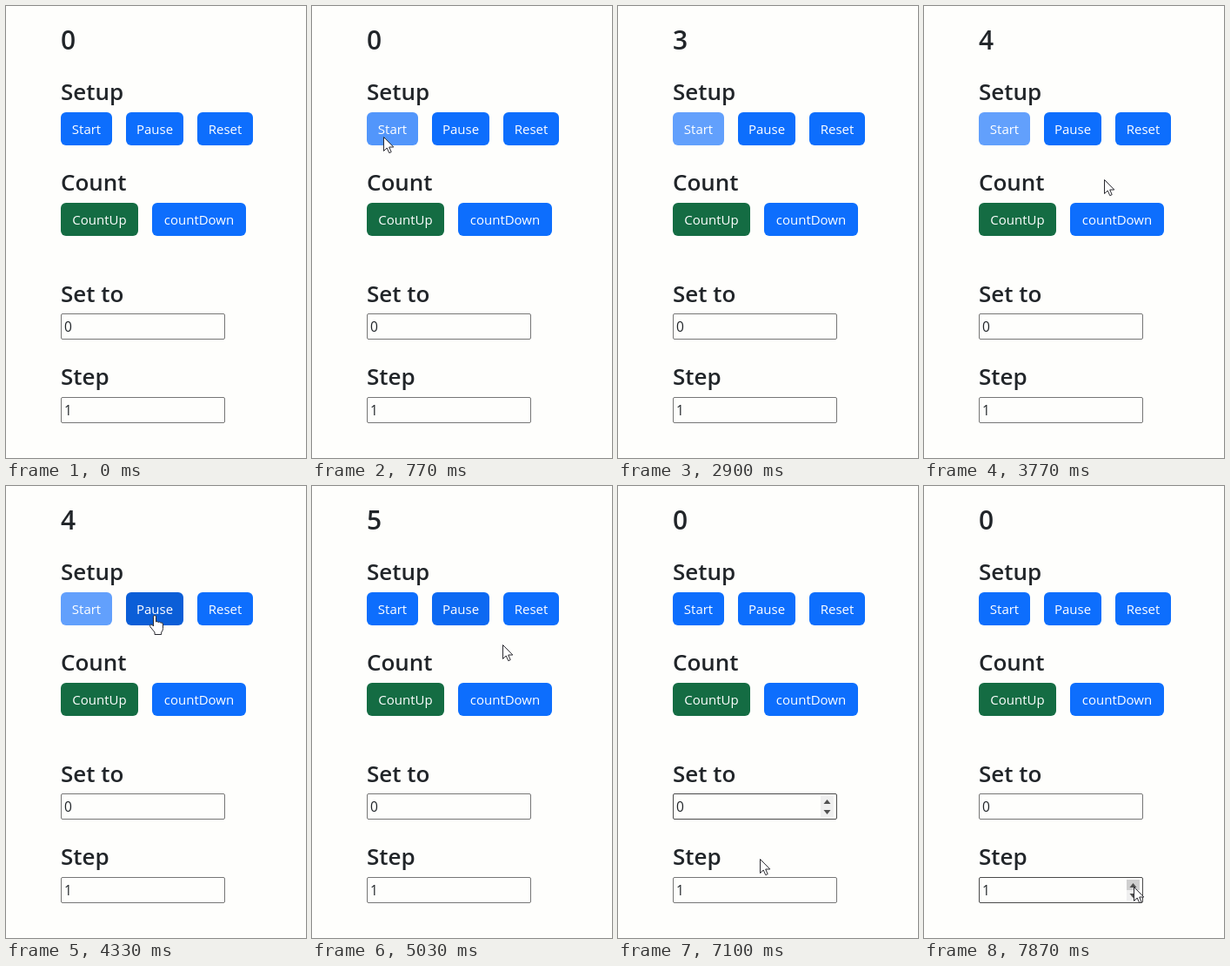
Animation, 345 px wide and 519 px high, one loop 8 s. Source, as an HTML page with a canvas:

```html
<!DOCTYPE html>
<html lang="en">
<head>
<meta charset="utf-8">
<title>Counter</title>
<style>
  html, body { margin: 0; width: 100%; height: 100%; overflow: hidden; background: #fefefc; }
  canvas { display: block; }
</style>
</head>
<body>
<canvas></canvas>
<script>
const W = 345, H = 519, LOOP = 8000;
const FONT = '"Open Sans", "Noto Sans", sans-serif';
const PAPER = '#fefefc', INK = '#212529';
const BLUE = [13, 110, 253], BLUE_HOVER = [11, 94, 215], BLUE_ACTIVE = [10, 88, 202];
const BLUE_OFF = [98, 160, 252], GREEN = [20, 108, 67];

const canvas = document.querySelector('canvas');
const scale = window.devicePixelRatio || 1;
canvas.width = W * scale;
canvas.height = H * scale;
canvas.style.width = W + 'px';
canvas.style.height = H + 'px';
const ctx = canvas.getContext('2d');

const START = 650, PAUSE = 4650, RESET = 5870, TICK = 750;

const buttons = [
  { label: 'Start', x: 63, y: 122, w: 59, press: START },
  { label: 'Pause', x: 138, y: 122, w: 66, press: PAUSE },
  { label: 'Reset', x: 220, y: 122, w: 64, press: RESET },
  { label: 'CountUp', x: 63, y: 226, w: 89, green: true },
  { label: 'countDown', x: 168, y: 226, w: 108 }
];
const inputs = [
  { y: 353, value: '0', from: 6850, to: 7150 },
  { y: 449, value: '1', from: 7190, to: LOOP }
];

// Each visit of the pointer: time, x, y
const visits = [
  [[30, 346, 446], [260, 225, 335], [430, 160, 246], [570, 82, 150], [1000, 82, 150],
   [1240, 205, 178], [1500, 348, 248]],
  [[3330, 348, 330], [3560, 290, 222], [3770, 207, 199], [4050, 171, 149], [4860, 171, 149],
   [5030, 219, 182], [5220, 241, 172], [5560, 253, 149], [6400, 253, 149], [6640, 232, 245],
   [6880, 202, 340], [7000, 184, 385], [7100, 163, 428], [7200, 165, 446], [7400, 203, 463],
   [7630, 241, 466], [7760, 241, 466], [7830, 241, 460], [8001, 241, 460]]
];

const clamp = v => Math.max(0, Math.min(1, v));
const mix = (a, b, k) => a.map((v, i) => v + (b[i] - v) * k);
const rgb = c => `rgb(${c.map(Math.round).join(',')})`;
const still = (a, b) => a[1] === b[1] && a[2] === b[2];

function slope(path, i, axis) {
  const a = path[i - 1], p = path[i], b = path[i + 1];
  if (!a || !b || still(a, p) || still(p, b)) return 0;
  return (b[axis] - a[axis]) / (b[0] - a[0]);
}

function pointer(t) {
  const path = visits.find(v => t >= v[0][0] && t < v[v.length - 1][0]);
  if (!path) return null;
  const i = path.findIndex((p, n) => t >= p[0] && t < path[n + 1][0]);
  const a = path[i], b = path[i + 1], span = b[0] - a[0], u = (t - a[0]) / span;
  const along = axis =>
    (1 + 2 * u) * (1 - u) ** 2 * a[axis] + u * (1 - u) ** 2 * span * slope(path, i, axis) +
    u * u * (3 - 2 * u) * b[axis] - u * u * (1 - u) * span * slope(path, i + 1, axis);
  return { x: along(1), y: along(2) };
}

const running = t => t >= START && t < PAUSE;

function hits(b, t) {
  const p = pointer(t);
  if (!p || (b.label === 'Start' && running(t))) return false;
  return p.x >= b.x && p.x < b.x + b.w && p.y >= b.y && p.y < b.y + 38;
}

// Averaging the recent past gives a 150 ms linear transition
function hover(b, t) {
  let sum = 0;
  for (let k = 0; k < 10; k++) sum += hits(b, t - k * 15);
  return sum / 10;
}

function count(t) {
  if (t < START || t >= RESET) return 0;
  return Math.floor((Math.min(t, PAUSE) - START) / TICK);
}

function text(str, x, y, size, weight, color = INK) {
  ctx.font = `${weight} ${size}px ${FONT}`;
  ctx.fillStyle = color;
  ctx.fillText(str, x, y);
}

function drawButton(b, t) {
  let color = b.green ? GREEN : mix(BLUE, BLUE_HOVER, hover(b, t));
  if (b.label === 'Start') {
    color = mix(color, BLUE_OFF, clamp((t - START) / 150) - clamp((t - PAUSE) / 150));
  } else if (b.press) {
    const down = clamp((t - b.press + 70) / 70) - clamp((t - b.press) / 130);
    color = mix(color, BLUE_ACTIVE, down);
  }
  ctx.fillStyle = rgb(color);
  ctx.beginPath();
  ctx.roundRect(b.x, b.y, b.w, 38, 6);
  ctx.fill();
  ctx.textAlign = 'center';
  text(b.label, b.x + b.w / 2, b.y + 25, 15, 400, '#fff');
  ctx.textAlign = 'left';
}

function triangle(x, y, dir) {
  ctx.beginPath();
  ctx.moveTo(x - 4, y);
  ctx.lineTo(x + 4, y);
  ctx.lineTo(x, y - 5 * dir);
  ctx.fill();
}

function drawInput(f, t) {
  const over = t >= f.from && t < f.to;
  ctx.fillStyle = PAPER;
  ctx.strokeStyle = over ? '#4a4a4a' : '#767676';
  ctx.lineWidth = 1;
  ctx.beginPath();
  ctx.roundRect(63.5, f.y + 0.5, 188, 29, 1.5);
  ctx.fill();
  ctx.stroke();
  text(f.value, 67, f.y + 21, 15.5, 400);
  if (!over) return;
  ctx.fillStyle = '#efefef';
  ctx.fillRect(233, f.y + 3, 15, 24);
  const p = pointer(t);
  if (p && p.x >= 233 && p.y >= f.y && p.y < f.y + 30) {
    ctx.fillStyle = '#cfcfcf';
    ctx.fillRect(233, f.y + (p.y < f.y + 15 ? 3 : 15), 15, 12);
  }
  ctx.fillStyle = '#505050';
  triangle(240.5, f.y + 12, 1);
  triangle(240.5, f.y + 19, -1);
}

const ARROW = new Path2D('M.5 .5V16.5L4.2 13L6.8 18.7L9.2 17.6L6.7 12H11.8Z');
const HAND = new Path2D('M4.5 13V2.2Q4.5 .5 6 .5T7.5 2.2V8Q8.8 6.8 10.2 8.4Q11.7 7.5 12.8 9' +
  'Q15.5 8.2 15.5 11V15.5Q15.5 18 13.7 20V22.5H6V20L1 13.8Q-.2 11.8 1.5 11Q3 10.6 4.5 13Z');
const BEAM = new Path2D('M-3 -8H-1L0 -7L1 -8H3M0 -7V7M-3 8H-1L0 7L1 8H3');

function drawPointer(t) {
  const p = pointer(t);
  if (!p) return;
  const inText = inputs.some(f => p.y >= f.y && p.y < f.y + 30 && p.x >= 63 && p.x < 233);
  const onButton = buttons.some(b => hits(b, t));
  ctx.save();
  ctx.translate(Math.round(p.x), Math.round(p.y));
  ctx.strokeStyle = '#2a2a30';
  ctx.fillStyle = '#fff';
  ctx.lineWidth = 1;
  if (inText) {
    ctx.stroke(BEAM);
  } else {
    if (onButton) ctx.translate(-6, -1);
    const shape = onButton ? HAND : ARROW;
    ctx.fill(shape);
    ctx.stroke(shape);
  }
  ctx.restore();
}

function draw(t) {
  ctx.setTransform(scale, 0, 0, scale, 0, 0);
  ctx.fillStyle = PAPER;
  ctx.fillRect(0, 0, W, H);
  text(String(count(t)), 63, 50, 30, 600);
  text('Setup', 63, 108, 26, 600);
  text('Count', 63, 212, 26, 600);
  text('Set to', 63, 340, 26, 600);
  text('Step', 63, 435, 26, 600);
  buttons.forEach(b => drawButton(b, t));
  inputs.forEach(f => drawInput(f, t));
  drawPointer(t);
}

const begin = performance.now();
function loop() {
  draw((performance.now() - begin) % LOOP);
  requestAnimationFrame(loop);
}
loop();
</script>
</body>
</html>
```
